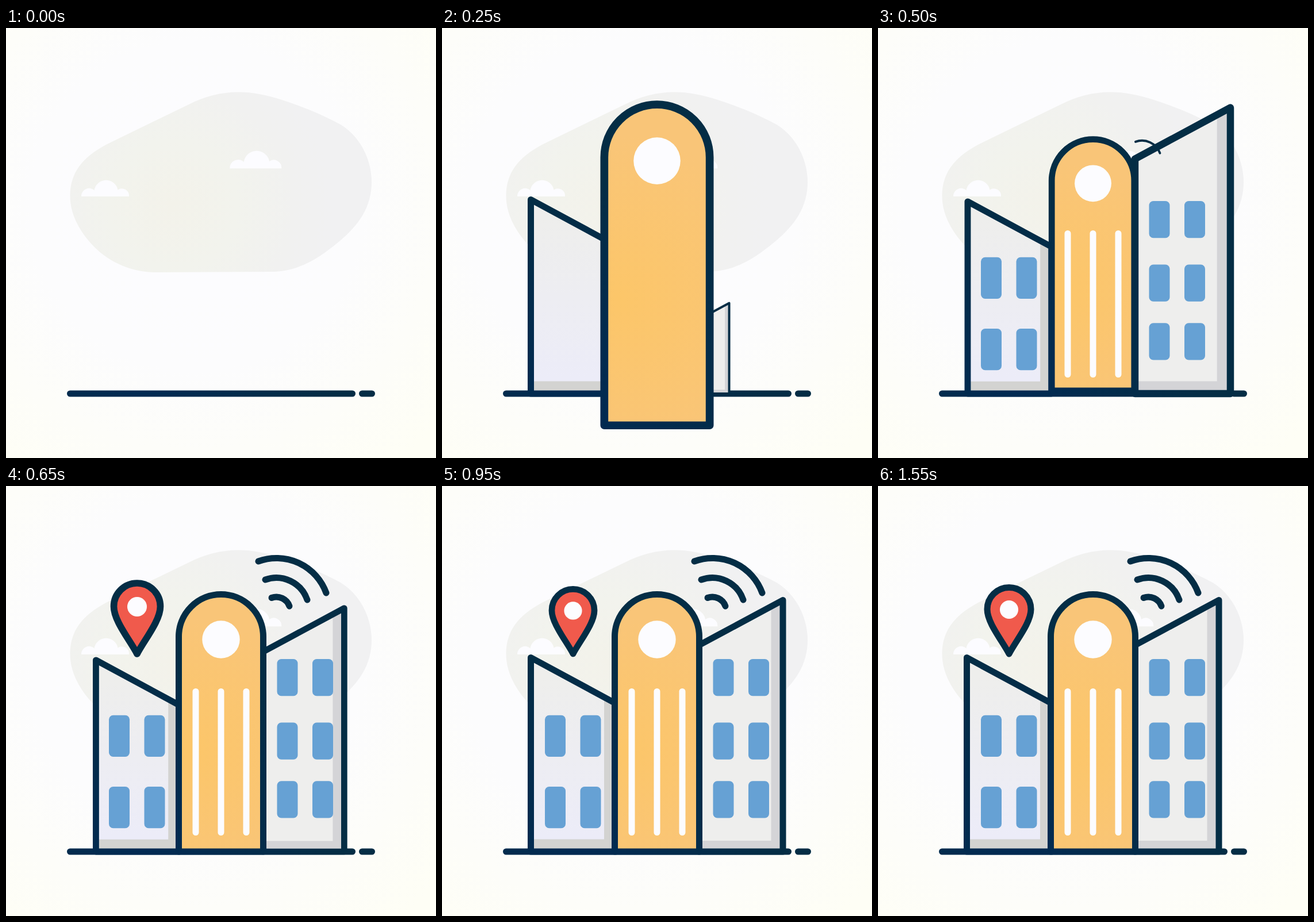
Write an HTML page that moves like this. It is 748x748 px and loops after 1600 ms.

```html
<!DOCTYPE html>
<html lang="en">
<head>
<meta charset="utf-8">
<title>City</title>
<style>
  html, body { margin: 0; width: 100%; height: 100%; overflow: hidden; background: #fdfdfb; }
  svg { display: block; width: 100vw; height: 100vh; }
  .ink { stroke: url(#navy); stroke-width: 11; stroke-linecap: round; stroke-linejoin: round; }
  .light { fill: #fcfcff; }
  .window { fill: #66a1d4; }
</style>
</head>
<body>
<svg viewBox="0 0 748 748" xmlns="http://www.w3.org/2000/svg">
  <defs>
    <radialGradient id="sky" gradientUnits="userSpaceOnUse" cx="330" cy="310" r="570">
      <stop offset="0" stop-color="#fcfcff"/>
      <stop offset=".5" stop-color="#fcfcfd"/>
      <stop offset="1" stop-color="#fefef5"/>
    </radialGradient>
    <radialGradient id="haze" gradientUnits="userSpaceOnUse" cx="290" cy="310" r="280">
      <stop offset="0" stop-color="#f3f2ea"/>
      <stop offset=".4" stop-color="#f2f3ed"/>
      <stop offset=".75" stop-color="#f1f1f0"/>
      <stop offset="1" stop-color="#f1f1f2"/>
    </radialGradient>
    <radialGradient id="navy" gradientUnits="userSpaceOnUse" cx="240" cy="620" r="330">
      <stop offset="0" stop-color="#012a53"/>
      <stop offset="1" stop-color="#042d45"/>
    </radialGradient>
    <radialGradient id="amber" gradientUnits="userSpaceOnUse" cx="320" cy="460" r="230">
      <stop offset="0" stop-color="#fcc669"/>
      <stop offset="1" stop-color="#f9c578"/>
    </radialGradient>
    <linearGradient id="wall" gradientUnits="userSpaceOnUse" x1="0" y1="330" x2="0" y2="610">
      <stop offset="0" stop-color="#eeeeec"/>
      <stop offset="1" stop-color="#ececf8"/>
    </linearGradient>
    <path id="cloud" class="light" d="M0 28A13.5 13.5 0 0 1 22.5 17.5A20.8 20.8 0 0 1 63.5 16.5A12.5 12.5 0 0 1 83 28Z"/>
  </defs>

  <rect width="748" height="748" fill="url(#sky)"/>
  <path fill="url(#haze)" d="M111.5 292C111.5 250 135 223 178 201L318 133C345 119 375 111.5 404 111.5C430 111.5 450 116 480 125C520 138 553 152 582 168C615 188 636 227 636 268C636 310 615 342 580 371C545 400 510 424 460 424L262 425C215 425 175 405 148 375C125 349 111.5 321 111.5 292Z"/>
  <use href="#cloud" x="131" y="265"/>
  <use href="#cloud" transform="translate(389.3 214) scale(1.084)"/>
  <path class="ink" d="M111.5 636H602.5M619.5 636H636.5"/>

  <g id="left">
    <path fill="url(#wall)" d="M154.5 298.5L301.7 378V636H154.5Z"/>
    <path fill="#d3d3d1" d="M282 367L301.7 378V636H154.5V614.5H282Z"/>
    <path class="ink" fill="none" d="M154.5 298.5L301.7 378V636H154.5Z"/>
  </g>
  <g id="right">
    <path fill="#eeeeed" d="M593 198.5L447 277V636H593Z"/>
    <path fill="#d4d4d7" d="M593 198.5L572.5 209.5V617H447V636H593Z"/>
    <path class="ink" fill="none" d="M593 198.5L447 277V636H593Z"/>
  </g>
  <g id="tower">
    <path class="ink" fill="url(#amber)" d="M300.5 636V262A73.5 73.5 0 0 1 447.5 262V636Z"/>
    <circle class="light" cx="374" cy="267" r="32.7"/>
  </g>
  <g id="details"></g>
  <g fill="none" class="ink">
    <path id="far" d="M439 131A92 92 0 0 1 557 186"/>
    <path id="mid" d="M451 163A57 57 0 0 1 524 198"/>
    <path id="near" d="M462 194.5A24 24 0 0 1 493 209"/>
  </g>
  <g id="pin">
    <path class="ink" fill="#f05a4c" d="M228 292C216 269 190 238 190 214.5A38 38 0 0 1 266 214.5C266 238 240 269 228 292Z"/>
    <circle class="light" cx="228" cy="215" r="16"/>
  </g>
</svg>
<script>
const LOOP = 1600, STEP = 50;
const SPRING = [0, .36, .72, 1, 1.27, 1.247, 1.137, 1.054, .99, .968, .977, .987, .995, 1];
const GROW = [0, .36, 1];
const byId = id => document.getElementById(id);
const details = byId('details');
const parts = [];

// Value of a curve sampled every STEP ms, held at its end
function sample(curve, ms) {
  const u = Math.min(Math.max(ms / STEP, 0), curve.length - 1);
  const i = Math.floor(u), next = curve[Math.min(i + 1, curve.length - 1)];
  return curve[i] + (next - curve[i]) * (u - i);
}

function animate(el, x, y, curve, start, { rate = 1, vertical = false } = {}) {
  parts.push({ el, x, y, curve, start, rate, vertical });
}

function addRect(cls, x, y, width, height, rx) {
  const el = document.createElementNS('http://www.w3.org/2000/svg', 'rect');
  el.setAttribute('class', cls);
  Object.entries({ x, y, width, height, rx }).forEach(([k, v]) => el.setAttribute(k, v));
  return details.appendChild(el);
}

function addWindows(columns, rows, height, start) {
  for (const y of rows) for (const x of columns) {
    const el = addRect('window', x, y, 36, height, 7.5);
    animate(el, x + 18, y + height / 2, GROW, start);
  }
}

animate(byId('tower'), 374, 412.3, SPRING, 0);
animate(byId('left'), 301.7, 636, SPRING, 100);
animate(byId('right'), 447, 636, SPRING, 200);
[330, 374, 418].forEach((x, i) => {
  const bar = addRect('light', x - 5.5, 352, 11, 256, 5.5);
  animate(bar, x, 608, GROW, 250 + i * 50, { vertical: true });
});
addWindows([179, 240.5], [398.7, 523], 72.3, 350);
addWindows([471.5, 533], [301, 411.5, 513.3], 64.2, 400);
['far', 'mid', 'near'].forEach((id, i) => animate(byId(id), 453, 235.5, GROW, 450 + i * 50));
animate(byId('pin'), 228, 292, SPRING, 500, { rate: 1.08 });

function draw(now) {
  const t = Math.floor((now % LOOP) / STEP) * STEP;
  for (const { el, x, y, curve, start, rate, vertical } of parts) {
    const s = sample(curve, (t - start) * rate);
    el.style.display = s > 0 ? '' : 'none';
    el.setAttribute('transform',
      `translate(${x} ${y}) scale(${vertical ? 1 : s} ${s}) translate(${-x} ${-y})`);
  }
}

const origin = performance.now();
function tick() {
  draw(performance.now() - origin);
  requestAnimationFrame(tick);
}
tick();
</script>
</body>
</html>
```
